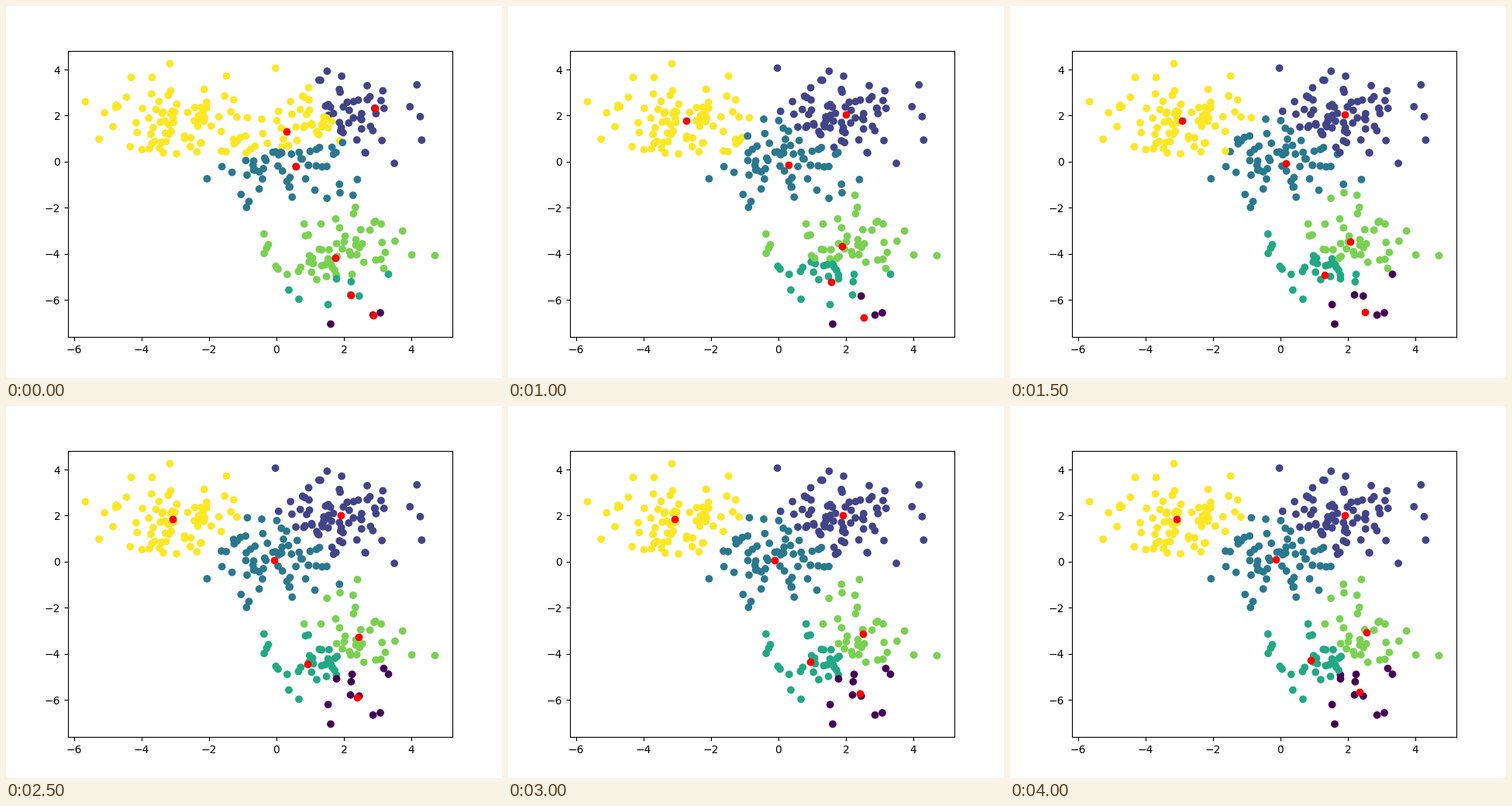
Animation, 640 px wide and 480 px high, one loop 4.5 s. Source, as a matplotlib script:

```python
import numpy as np
import matplotlib.pyplot as plt
from matplotlib.animation import FuncAnimation

STEPS = 9
INTERVAL = 500
BLOBS = [(0, 0), (2, 2), (-3, 2), (2, -4)]
PER_BLOB = 75
SEEDS = [(2.88, -6.68), (2.92, 2.32), (0.58, -0.21),
         (2.21, -5.80), (1.75, -4.18), (0.31, 1.29)]


def make_points():
    """Four unit-variance Gaussian blobs in shuffled order."""
    rng = np.random.RandomState(0)
    points = np.vstack([rng.normal(loc=c, scale=1.0, size=(PER_BLOB, 2))
                        for c in BLOBS])
    order = np.arange(len(points))
    rng.shuffle(order)
    return points[order]


def nearest(points, targets):
    """Index of the closest target for each point."""
    gaps = points[:, None, :] - np.asarray(targets)[None, :, :]
    return (gaps ** 2).sum(axis=2).argmin(axis=1)


def lloyd(points, centers, steps):
    """Centers and labels at each k-means iteration."""
    history = []
    for _ in range(steps):
        labels = nearest(points, centers)
        history.append((centers, labels))
        centers = np.array([points[labels == k].mean(axis=0)
                            for k in range(len(centers))])
    return history


points = make_points()
start = points[nearest(np.array(SEEDS), points)]
history = lloyd(points, start, STEPS)

fig, ax = plt.subplots(figsize=(6.4, 4.8), dpi=100)
dots = ax.scatter(points[:, 0], points[:, 1], c=history[0][1], cmap="viridis")
marks = ax.scatter(start[:, 0], start[:, 1], c="r")


def update(step):
    centers, labels = history[step]
    dots.set_array(labels)
    marks.set_offsets(centers)
    return dots, marks


anim = FuncAnimation(fig, update, frames=STEPS, interval=INTERVAL,
                     repeat=True, repeat_delay=0)
plt.show()
```
